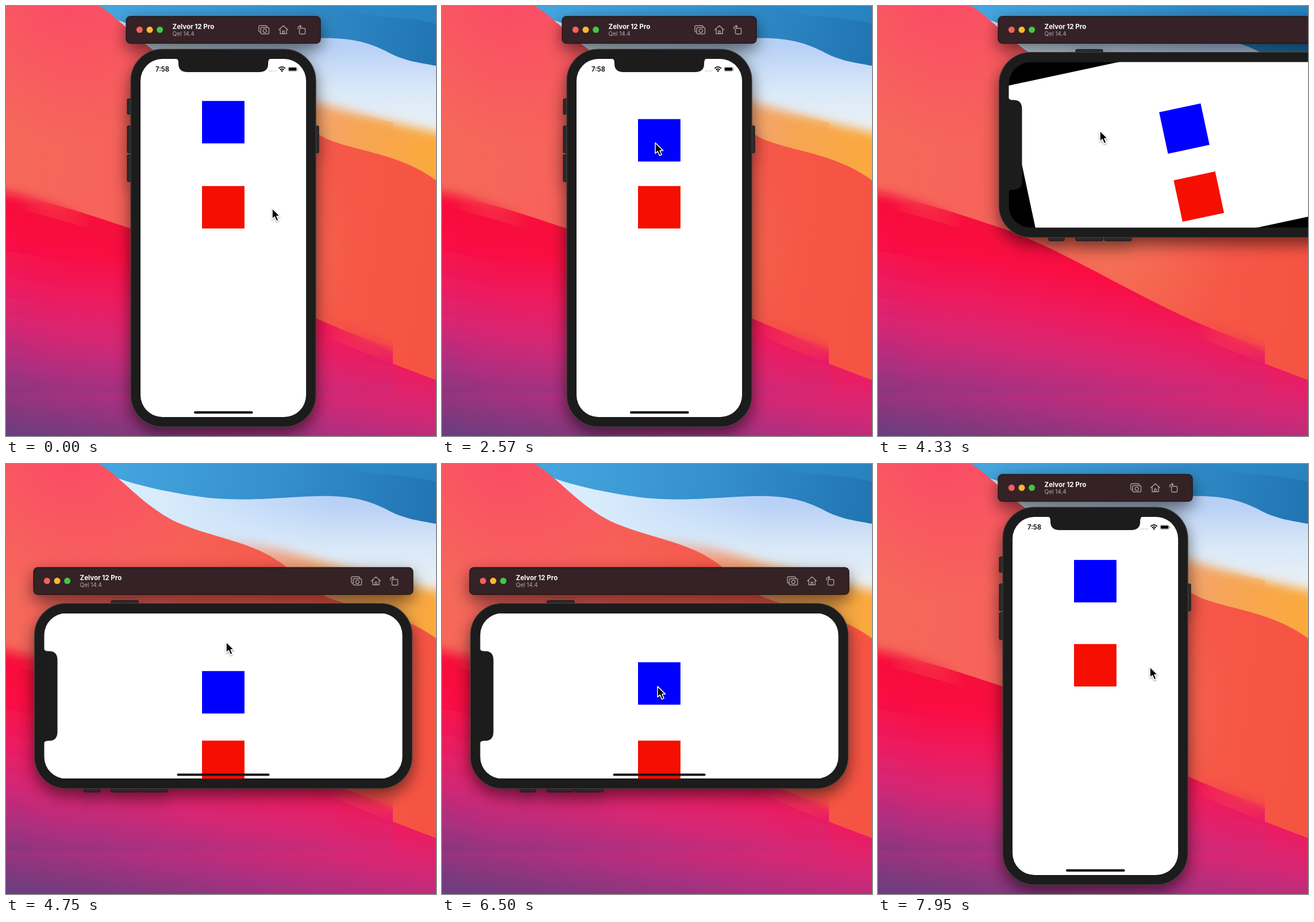
An HTML page for the animation above (8000 ms loop, 748 by 748 pixels).

```html
<!DOCTYPE html>
<html lang="en">
<head>
<meta charset="utf-8">
<title>Dragging a square through rotation</title>
<style>
  html, body { margin: 0; width: 100%; height: 100%; overflow: hidden; }
  svg { display: block; width: 100vw; height: 100vh; }
  text { font-family: Inter, "Liberation Sans", sans-serif; }
</style>
</head>
<body>
<svg viewBox="0 0 748 748">
  <defs>
    <linearGradient id="sky" x2="0" y2="1">
      <stop offset=".08" stop-color="#b3cdf5"/>
      <stop offset=".3" stop-color="#b9d1f6"/>
      <stop offset=".6" stop-color="#d9e8f8"/>
      <stop offset="1" stop-color="#f0f4f6"/>
    </linearGradient>
    <linearGradient id="pale">
      <stop offset=".2" stop-color="#d8ecfb"/>
      <stop offset=".7" stop-color="#d8ecfb" stop-opacity="0"/>
    </linearGradient>
    <linearGradient id="sea" gradientUnits="userSpaceOnUse" x1="180" y1="0" x2="748" y2="100">
      <stop offset="0" stop-color="#45a5de"/>
      <stop offset=".5" stop-color="#3590cd"/>
      <stop offset="1" stop-color="#2074b1"/>
    </linearGradient>
    <linearGradient id="amber" gradientUnits="userSpaceOnUse" x1="360" y1="0" x2="748" y2="0">
      <stop offset="0" stop-color="#e8a9a0" stop-opacity=".3"/>
      <stop offset=".3" stop-color="#f0a283"/>
      <stop offset=".65" stop-color="#f7a555"/>
      <stop offset="1" stop-color="#faa93c"/>
    </linearGradient>
    <linearGradient id="coral" gradientUnits="userSpaceOnUse" x1="0" y1="200" x2="748" y2="300">
      <stop offset="0" stop-color="#f5695a"/>
      <stop offset=".3" stop-color="#f7625a"/>
      <stop offset=".65" stop-color="#f5594a"/>
      <stop offset="1" stop-color="#f65443"/>
    </linearGradient>
    <radialGradient id="rose" gradientUnits="userSpaceOnUse" cx="110" cy="-20" r="260">
      <stop offset="0" stop-color="#fb4a66"/>
      <stop offset="1" stop-color="#fb4a66" stop-opacity="0"/>
    </radialGradient>
    <radialGradient id="glow" gradientUnits="userSpaceOnUse" cx="410" cy="420" r="210">
      <stop offset="0" stop-color="#f57658" stop-opacity=".8"/>
      <stop offset="1" stop-color="#f57658" stop-opacity="0"/>
    </radialGradient>
    <linearGradient id="berry" gradientUnits="userSpaceOnUse" x1="0" y1="330" x2="-73" y2="735">
      <stop offset="0" stop-color="#f60f3a"/>
      <stop offset=".17" stop-color="#fa0d42"/>
      <stop offset=".37" stop-color="#ec1c61"/>
      <stop offset=".53" stop-color="#d52774"/>
      <stop offset=".7" stop-color="#aa3080"/>
      <stop offset=".84" stop-color="#82387d"/>
      <stop offset="1" stop-color="#5a4183"/>
    </linearGradient>
    <linearGradient id="crisp" gradientUnits="userSpaceOnUse" x1="0" y1="0" x2="748" y2="0">
      <stop offset=".03" stop-color="#000"/>
      <stop offset=".2" stop-color="#fff"/>
      <stop offset=".74" stop-color="#fff"/>
      <stop offset=".9" stop-color="#000"/>
    </linearGradient>
    <linearGradient id="misty" gradientUnits="userSpaceOnUse" x1="0" y1="0" x2="748" y2="0">
      <stop offset=".03" stop-color="#fff"/>
      <stop offset=".2" stop-color="#000"/>
      <stop offset=".74" stop-color="#000"/>
      <stop offset=".9" stop-color="#fff"/>
    </linearGradient>
    <linearGradient id="east" gradientUnits="userSpaceOnUse" x1="600" y1="0" x2="740" y2="0">
      <stop offset="0" stop-color="#000"/>
      <stop offset="1" stop-color="#fff"/>
    </linearGradient>
    <mask id="crispMask" maskUnits="userSpaceOnUse" width="748" height="748"><rect width="748" height="748" fill="url(#crisp)"/></mask>
    <mask id="mistyMask" maskUnits="userSpaceOnUse" width="748" height="748"><rect width="748" height="748" fill="url(#misty)"/></mask>
    <mask id="eastMask" maskUnits="userSpaceOnUse" width="748" height="748"><rect width="748" height="748" fill="url(#east)"/></mask>
    <filter id="blur"><feGaussianBlur stdDeviation="9"/></filter>
    <filter id="shade" x="-20%" y="-20%" width="140%" height="140%">
      <feDropShadow dx="0" dy="11" stdDeviation="14" flood-color="#000" flood-opacity=".55"/>
    </filter>
    <filter id="soft" x="-50%" y="-50%" width="200%" height="200%">
      <feDropShadow dx="0" dy="1.5" stdDeviation="1.4" flood-color="#000" flood-opacity=".4"/>
    </filter>
    <clipPath id="screen"><rect x="-144" y="-311.5" width="288" height="623" rx="38"/></clipPath>
    <path id="hill" d="M-60 315C40 328 130 358 217 387C280 410 325 434 375 460C430 489 490 521 545 546C610 574 690 605 810 650V830H-60Z"/>
    <path id="dune" d="M350 128C420 132 490 152 560 173C620 190 690 208 800 230V330H350Z"/>
  </defs>

  <g id="wallpaper">
    <rect width="748" height="240" fill="url(#sky)"/>
    <rect x="150" width="598" height="240" fill="url(#pale)"/>
    <path fill="url(#sea)" d="M150 0L195 25C240 41 300 52 345 58C420 66 470 58 540 56C600 54 632 64 660 78C690 95 715 98 748 104V0Z"/>
    <path fill="#2c8cca" opacity=".6" d="M575 0C605 12 630 17 670 19C705 22 730 26 748 31V0Z"/>
    <use href="#dune" fill="url(#amber)" filter="url(#blur)"/>
    <use href="#dune" fill="url(#amber)" mask="url(#eastMask)"/>
    <g id="shore"></g>
    <use href="#hill" y="24" fill="url(#berry)"/>
    <g mask="url(#mistyMask)"><use href="#hill" fill="url(#berry)" filter="url(#blur)"/></g>
    <use href="#hill" fill="url(#berry)" mask="url(#crispMask)"/>
  </g>

  <g id="win">
    <g filter="url(#shade)">
      <rect id="bar" height="47" rx="7" fill="#352326" stroke="#140b0d"/>
      <g class="device">
        <g fill="#2a2a2a" stroke="#111" stroke-width=".8">
          <rect x="-167" y="-242" width="8" height="27" rx="1.5"/>
          <rect x="-167" y="-195" width="8" height="47" rx="1.5"/>
          <rect x="-167" y="-145" width="8" height="47" rx="1.5"/>
          <rect x="158" y="-195" width="8" height="47" rx="1.5"/>
        </g>
        <rect x="-161" y="-328.5" width="322" height="657" rx="55" fill="#1b1c1b" stroke="#45403e" stroke-width="1.2"/>
      </g>
    </g>
    <circle cx="23.3" cy="23.3" r="5.5" fill="#f5605a"/>
    <circle cx="41" cy="23.3" r="5.5" fill="#fdb930"/>
    <circle cx="58.6" cy="23.3" r="5.5" fill="#41c940"/>
    <text x="80.5" y="21.6" font-size="11.5" font-weight="700" fill="#fff">Zelvor 12 Pro</text>
    <text x="80.5" y="34" font-size="10" fill="#b5a8aa">Qel 14.4</text>
    <g id="tools" fill="none" stroke="#aa9c9e" stroke-width="1.4" stroke-linejoin="round" stroke-linecap="round">
      <rect x=".7" y=".7" width="14.5" height="11" rx="2"/>
      <rect x="4" y="4" width="14.5" height="11" rx="2" fill="#352326"/>
      <circle cx="11.2" cy="9.6" r="3"/>
      <path d="M35.500 8L43.500 .7L51.500 8M38 6.500V14.700H49V6.500M42 14V10H45V14"/>
      <rect x="71.500" y="5.200" width="10" height="10" rx="2"/>
      <path d="M68.700 6.500V5Q68.700 2 72 2H74.500M72.500 0L74.700 2L72.500 4"/>
    </g>
    <g class="device">
      <g clip-path="url(#screen)">
        <rect x="-144" y="-311.5" width="288" height="623"/>
        <g id="view">
          <rect id="page" fill="#fff"/>
          <rect id="red" x="-37" width="73.8" height="73.8" fill="#f60f00"/>
          <rect id="blue" x="-37" width="73.8" height="73.8" fill="#00f"/>
        </g>
        <path id="sideHome" d="M-137 -78.500V78.500" stroke="#151515" stroke-width="4" stroke-linecap="round"/>
        <g id="upright">
          <path d="M-49 303.500H49.500" stroke="#000" stroke-width="4" stroke-linecap="round"/>
          <text x="-118" y="-289.500" font-size="11.3" font-weight="600">7:58</text>
          <path d="M80 -290.500H92" stroke="#b9b9b9" stroke-width="1.700" stroke-dasharray="1.700 1.700"/>
          <g fill="none" stroke="#000" stroke-width="1.800">
            <path d="M96.300 -295Q102 -300.300 107.700 -295M98.600 -292.500Q102 -295.600 105.400 -292.500"/>
          </g>
          <path d="M102 -288.800L99.900 -291Q102 -292.700 104.100 -291Z"/>
          <rect x="112.700" y="-297.300" width="15.600" height="7.400" rx="2.300" fill="none" stroke="#999" stroke-width=".8"/>
          <rect x="113.800" y="-296.200" width="13.400" height="5.200" rx="1.300"/>
          <path d="M129.500 -295V-292.200" stroke="#999"/>
        </g>
      </g>
      <path fill="#1b1c1b" d="M-84 -312.500Q-78 -312 -78 -305V-303Q-78 -288.500 -62 -288.500H62Q78 -288.500 78 -303V-305Q78 -312 84 -312.500Z"/>
    </g>
  </g>
  <path id="cursor" filter="url(#soft)" stroke="#fff" stroke-width="1.500" stroke-linejoin="round"
    d="M0 0V18.500L4.300 14.700L7.500 22.300L11 20.800L7.900 13.500H13.600Z"/>
</svg>
<script>
const $ = id => document.getElementById(id);
const set = (el, attrs) => { for (const k in attrs) el.setAttribute(k, attrs[k]); };

const wave = 'M-5 -5H155L162 0C175 8 185 16 195 25C222 48 250 77 292 99C350 125 400 130 452 156' +
  'C500 181 520 215 562 233C620 255 690 258 753 307V753H-5Z';
$('shore').innerHTML = ['coral', 'rose', 'glow']
  .map(fill => `<path d="${wave}" fill="url(#${fill})"/>`).join('');

// All keys are in twelfths of a second.
const TICK = 1000 / 12, LOOP = 8000;
const pointer = [
  [0, 463, 352], [6, 470, 348], [11, 470, 348], [18, 377, 206], [24, 374, 267], [31, 371, 238],
  [35, 376, 310], [40, 383, 233], [43, 384, 231], [45, 385, 222], [49, 386, 217], [53, 386, 217],
  [61, 380, 402], [68, 376, 350], [75, 373, 405], [80, 376, 377], [85, 468, 357], [86, 469, 356], [95, 473, 353]
];
const drag = [
  [18, 0], [24, 60], [31, 31.5], [35, 104], [40, 38], [43, 35.5], [45, 27],
  [61, 27], [68, -25], [75, 30], [80, 1.7]
];
const turn = [[50, 0], [51, .55], [52, .866], [53, 1], [85, 1], [86, .975], [88, .975], [89, .3], [90, .08], [91, 0]];
const place = [[52, 209, 18], [54, 48, 180]];

const smooth = u => u * u * (3 - 2 * u);

function at(keys, n, ease = smooth) {
  const i = keys.findIndex(k => k[0] > n);
  if (i === 0) return keys[0].slice(1);
  if (i < 0) return keys[keys.length - 1].slice(1);
  const a = keys[i - 1], b = keys[i];
  const u = ease((n - a[0]) / (b[0] - a[0]));
  return a.slice(1).map((v, j) => v + (b[j + 1] - v) * u);
}

function draw(ms) {
  const n = Math.floor((ms + 20) / TICK);
  const wide = n >= 51 && n < 86;
  const [x, y] = n < 86 ? at(place, n) : n < 89 ? [48, 126] : [209, 18];
  const [q] = at(turn, n, u => u);
  const [shift] = at(drag, n);
  const w = wide ? 660 : 338;
  const hw = 144 + 168 * q, hh = 311.5 - 168 * q;

  set($('win'), { transform: `translate(${x} ${y})` });
  set($('bar'), { width: w });
  set($('tools'), { transform: `translate(${w - 108} 15.5)` });
  const pose = `translate(${w / 2} ${wide ? 223.5 : 385.5}) rotate(${wide ? -90 : 0})`;
  document.querySelectorAll('.device').forEach(el => set(el, { transform: pose }));

  set($('view'), { transform: `rotate(${90 * q})` });
  set($('page'), { x: -hw, y: -hh, width: 2 * hw, height: 2 * hh });
  set($('red'), { y: 221.2 - hh });
  set($('blue'), { y: 73.2 + shift - hh });
  set($('upright'), { opacity: q === 0 ? 1 : 0 });
  set($('sideHome'), { opacity: q === 1 ? 1 : q > .9 ? .75 : 0 });
  set($('cursor'), { transform: `translate(${at(pointer, n).join(' ')})` });
}

let start;
function tick(now) {
  start ??= now;
  draw((now - start) % LOOP);
  requestAnimationFrame(tick);
}
draw(0);
requestAnimationFrame(tick);
</script>
</body>
</html>
```
